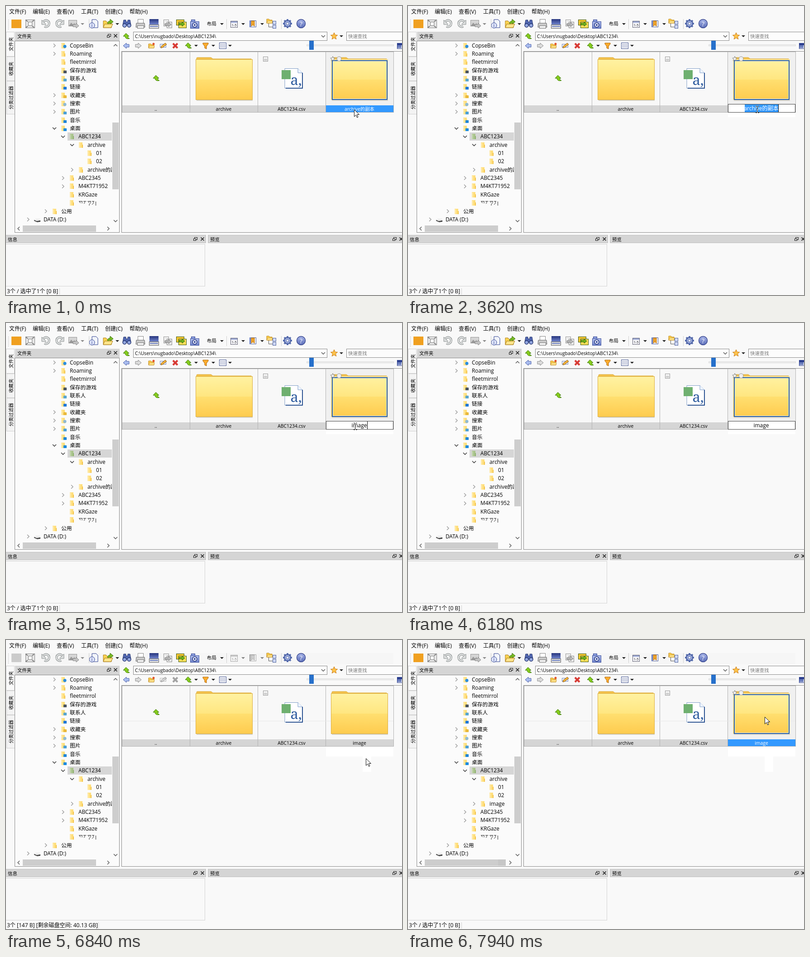
An HTML page with a canvas that plays this animation: 875x640 px, repeating every 8000 ms.

```html
<!DOCTYPE html>
<html lang="zh">
<head>
<meta charset="utf-8">
<style>
html, body { margin: 0; width: 100%; height: 100%; overflow: hidden; background: #f9f9f9 }
canvas { display: block }
</style>
</head>
<body>
<canvas id="stage" width="875" height="640"></canvas>
<script>
const c = document.getElementById('stage').getContext('2d');
const FONT = '"Open Sans","Noto Sans CJK SC","Noto Sans CJK",sans-serif';
const BG = '#f9f9f9', BAR = '#d5d5d5', LINE = '#8a8a8a', BLUE = '#3399ff', NAVY = '#2c3f8f';

// Drawing helpers
function rect(x, y, w, h, fill) { c.fillStyle = fill; c.fillRect(x, y, w, h); }
function box(x, y, w, h, stroke, fill, lw = 1) {
  if (fill) rect(x, y, w, h, fill);
  c.strokeStyle = stroke; c.lineWidth = lw;
  c.strokeRect(x + .5, y + .5, w - 1, h - 1);
}
function text(s, x, y, size = 12, color = '#000', align = 'left', font = FONT) {
  c.font = size + 'px ' + font; c.fillStyle = color; c.textAlign = align;
  c.fillText(s, x, y);
  return c.measureText(s).width;
}
function path(x, y, d, fill, stroke, lw = 1) {
  const p = new Path2D(d);
  c.save(); c.translate(x, y);
  if (fill) { c.fillStyle = fill; c.fill(p); }
  if (stroke) { c.strokeStyle = stroke; c.lineWidth = lw; c.stroke(p); }
  c.restore();
}
function disc(x, y, r, fill, stroke, lw = 1) {
  c.beginPath(); c.arc(x, y, r, 0, 7);
  if (fill) { c.fillStyle = fill; c.fill(); }
  if (stroke) { c.strokeStyle = stroke; c.lineWidth = lw; c.stroke(); }
}
function shade(y0, y1, ...colors) {
  const g = c.createLinearGradient(0, y0, 0, y1);
  colors.forEach((k, i) => g.addColorStop(i / (colors.length - 1), k));
  return g;
}
function muted(on, draw) {
  c.save();
  if (on) c.filter = 'grayscale(1) opacity(.55)';
  draw();
  c.restore();
}

// Small parts
const drop = (x, y, color = '#222') => path(x, y, 'M-4-2H4L0 2Z', color);
const chevron = (x, y, turn, color = '#555') =>
  path(x, y, { r: 'M-2-4L2 0L-2 4', l: 'M2-4L-2 0L2 4', d: 'M-4-2L0 2L4-2', u: 'M-4 2L0-2L4 2' }[turn], null, color, 1.4);
const greenArrow = (x, y) => path(x, y, 'M-1-6.5L-7 0H-3C-3 4 1 7 7 5C4 4 3 2 3 0H6Z', '#86cc1c', '#3d7a0a');
function star(x, y, r, fill, stroke) {
  let d = '';
  for (let i = 0; i < 10; i++) {
    const a = i * Math.PI / 5, q = i % 2 ? r * .45 : r;
    d += (i ? 'L' : 'M') + Math.sin(a) * q + ' ' + -Math.cos(a) * q;
  }
  path(x, y, d + 'Z', fill, stroke);
}
function panelButtons(x, y, gap) {
  box(x - 2, y - 4, 7, 6, '#222'); box(x - 4, y - 1, 6, 5, '#222', BAR);
  path(x + gap, y, 'M-3.5-3.5L3.5 3.5M3.5-3.5L-3.5 3.5', null, '#222', 1.6);
}
function smallFolder(x, y, green) {
  rect(x, y - 6, 8, 12, green ? '#a9c48c' : '#ffdf7d');
  rect(x, y - 5, 3, 11, green ? '#bed3a8' : '#ffe9a6');
  rect(x + 7, y - 1, 2, 7, green ? '#8fb070' : '#f3c34c');
}
function wideFolder(x, y) {
  path(x, y, 'M-6-4H-1L1-2H6V5H-6Z', '#ffd14d', '#bb851c');
  path(x, y, 'M-6 5L-4 0H7L6 5Z', '#ffe38a', '#bb851c', .7);
}

const ROWS = [
  ['CopseBin', 141, 'r', '#2a8de0'], ['Roaming', 141, 'r'], ['fleetmirrol', 141], ['保存的游戏', 141, '', '#4b5560'],
  ['联系人', 141, '', '#58a6cf'], ['链接', 141, '', '#1f78d8'], ['收藏夹', 141, 'r', '#e9b93c'], ['搜索', 141, 'r', '#8fbad4'],
  ['图片', 141, 'r', '#4ba0d8'], ['音乐', 141, '', '#1f86d8'], ['桌面', 141, 'd', '#1b8be0'], ['ABC1234', 160, 'd'],
  ['archive', 180, 'd'], ['01', 199], ['02', 199], ['archive的副本', 180, 'r'], ['ABC2345', 160, 'r'],
  ['M4KT71952', 160, 'r'], ['KRGaze', 160], ['', 160], ['公用', 122, 'r'], ['DATA (D:)', 83, 'r']
];

function tree(renamed) {
  box(19, 77, 232, 425, LINE, '#fbfbfb');
  rect(136, 280, 98, 18, '#d6d6d6');
  c.save(); c.beginPath(); c.rect(20, 78, 214, 407); c.clip();
  ROWS.forEach(([label, x, turn, badge], i) => {
    const y = 87.5 + 18.35 * i, last = i == ROWS.length - 1;
    if (turn) chevron(x - 34, y, turn, turn == 'd' ? '#333' : '#999');
    if (last) {
      path(x - 21, y + 2, 'M0-1L4-4H13L14 0L6 2Z', '#eee');
      path(x - 21, y + 2, 'M0-1L6 1.500L14 0V3L7 4L0 1Z', '#444');
    } else smallFolder(x - 19, Math.round(y), i == 11);
    if (badge) i == 0 || i == 7 ? disc(x - 11, y + 2, 3.5, badge) : rect(x - 14, Math.round(y), 7, 6, badge);
    text(i == 15 && renamed ? 'image' : label, x, y + 4, 11.8);
  });
  // Tiny script label
  path(161, 432, 'M0 .5H8M2 0V3L4 4M7 0V5M10 .5H16M13 0V4L11 6M18 1H19M20 .5H27M22 0V4M26 0V4L23 7V10M29 .5H34M32 0V5L29 8M37.500 1V10', null, '#333');
  c.restore();
  rect(235, 258, 14, 148, '#cdcdcd');
  chevron(242, 87, 'u'); chevron(242, 476, 'd');
  rect(37, 486, 162, 14, '#cdcdcd');
  if (renamed) rect(199, 486, 17, 14, '#c6c6c6');
  chevron(28, 493, 'l'); chevron(226, 493, 'r');
}

function sideTabs() {
  [['文件夹', 57, 112], ['收藏夹', 112, 166], ['分类过滤器', 166, 240]].forEach(([label, top, end], i) => {
    box(i ? 1 : 0, top, 19, end - top, '#d0d0d0', i ? '#f3f3f3' : BG);
    c.save(); c.translate(14.5, (top + end) / 2); c.rotate(-Math.PI / 2);
    text(label, 0, 0, 10.4, '#000', 'center');
    c.restore();
  });
}

function page(x, y, stroke = '#777') {
  path(x, y, 'M-6-9H3L7-5V9H-6Z', '#f3f6fb', stroke);
}

function toolbar(off) {
  ['文件(F)', '编辑(E)', '查看(V)', '工具(T)', '创建(C)', '帮助(H)'].forEach((s, i) => text(s, [7, 59, 112, 166, 219, 273][i], 17));
  for (let y = 30; y < 52; y += 3) rect(5, y, 1, 1, '#999');
  muted(off, () => rect(12, 30, 22, 19, '#f0a020'));
  box(43, 30, 21, 19, '#888', '#e6e6e6'); box(49, 35, 9, 9, '#777', '#fff');
  path(53, 39.500, 'M-9-8L-5-5M9-8L5-5M-9 8L-5 5M9 8L5 5', null, '#777', 2);
  for (const [x, s] of [[88, 1], [119, -1]]) {
    c.save(); c.translate(x, 39); c.scale(s, 1);
    path(0, 0, 'M-6-3A7 7 0 1 1-3 6', null, '#8b9090', 5);
    path(0, 0, 'M-6-3A7 7 0 1 1-3 6', null, '#dcdede', 3);
    path(0, 0, 'M-9-8V2H1Z', '#dcdede', '#8b9090');
    c.restore();
  }
  box(138, 31, 19, 14, '#999', '#d5d5d5'); path(147, 40, 'M-8 4L-3-3L1 1L4-2L8 4Z', '#989898');
  path(154, 44, 'M-6-3H1V-6L7 0L1 5V2H-6Z', '#c5c5c5', '#888'); drop(169, 40, '#888');
  page(196, 39, NAVY); disc(190, 43, 6, '#dfe5fa', NAVY); text('i', 190, 47, 11, NAVY, 'center');
  path(225, 39, 'M-10-6H-4L-2-3H8V9H-10Z', '#ffd452', '#a87b18');
  path(229, 36, 'M-5 6Q-5-3 1-3V-7L8-1L1 4V1Q-2 1-2 6Z', '#79bb23', '#3f7312');
  path(223, 43, 'M-8 5L-5-3H13L9 5Z', '#ffe58b', '#a87b18'); drop(246, 40);
  path(267, 39, 'M-7-8H-2V-4H2V-8H7L9 3H-9Z', '#5268b2', '#24346f');
  disc(262, 43, 4, '#92a6df', '#24346f', 1.5); disc(272, 43, 4, '#92a6df', '#24346f', 1.5);
  box(291, 29, 13, 10, '#888', '#fff'); path(297, 42, 'M-9-4H9L10 5H-10Z', '#ccc', '#666'); box(290, 43, 15, 7, '#777', '#eee');
  rect(317, 29, 20, 12, shade(29, 41, '#26357d', '#6f83cc')); box(316, 41, 22, 9, '#666', '#dedede'); rect(318, 44, 18, 2, '#6e82c5');
  box(348, 30, 12, 15, '#999', '#eee'); box(355, 35, 12, 14, '#888', '#eee'); path(358, 41, 'M-7-2H1V-5L7 0L1 5V2H-7Z', '#bbb', '#777');
  box(376, 30, 18, 13, '#3d5a13', '#f4c531'); box(381, 35, 18, 14, '#3d5a13', '#ffdf58');
  path(388, 40, 'M-6-2H1V-5L7 0L1 5V2H-6Z', '#70b31c', '#2d650c');
  box(409, 30, 9, 6, NAVY, '#8fa3e3'); box(407, 34, 20, 16, '#3b4e9c', shade(34, 50, '#b3c1ef', '#6d82c9'));
  disc(417, 42, 5, '#e6ebfc', '#26357d', 1.5); disc(417, 42, 2, NAVY);
  text('布局', 444, 43, 10.4); drop(477, 40);
  muted(off, () => {
    box(496, 33, 16, 15, '#667', '#f3f3f7'); rect(497, 34, 14, 3, '#9aa7d3'); text('1-5', 504, 45, 7, '#111', 'center'); drop(524, 40);
    box(538, 32, 15, 15, '#4b5c9c', '#fff'); path(546, 39, 'M-4-6H3V6L-.5 3L-4 6Z', '#f0a329', '#a76a12'); rect(538, 32, 3, 15, '#6c80c4'); drop(566, 40);
  });
  path(580, 34, 'M.5 0V12.500H10M.5 3.500H10', null, '#555'); wideFolder(582, 33);
  for (const y of [37, 46]) box(589, y - 4, 8, 8, '#53669f', '#cfd9f6');
  for (const x of [183, 487, 608]) rect(x, 29, 1, 22, '#cfcfcf');
  for (let i = 0; i < 8; i++) {
    c.save(); c.translate(622, 39); c.rotate(i * Math.PI / 4); rect(-2, -10, 4, 5, '#5d73b5'); c.restore();
  }
  disc(622, 39, 7, '#9fb0e2', '#465b9d', 2); disc(622, 39, 3, BG, '#465b9d');
  disc(652, 39, 9.5, shade(29, 49, '#a9b6ea', '#586bb7'), '#414f94', 1.5); text('?', 652, 45, 15, '#fff', 'center');
}

function addressBars(off) {
  greenArrow(266, 67);
  box(281, 57, 429, 20, LINE, '#fcfcfc');
  text('C:\\Users\\nugbado\\Desktop\\ABC1234\\', 285, 71, 10.2);
  chevron(701, 67, 'd');
  star(725, 67, 8, '#ffc34a', '#c87811'); drop(741, 67);
  box(752, 57, 130, 20, LINE, '#fcfcfc'); text('快速查找', 756, 71, 10.4, '#777');
  path(266, 88, 'M-7 0L0-6V-3H6V3H0V6Z', '#a9bdf0', '#4a5ea8');
  path(292, 88, 'M7 0L0-6V-3H-6V3H0V6Z', '#ddd', '#888');
  wideFolder(321, 88); disc(326, 84, 2.5, '#e3542b');
  muted(off, () => {
    box(340, 84, 14, 8, '#7589bf', '#eef2fc'); path(347, 88, 'M-5 5L-4 1L5-6L8-3L-1 4Z', '#f5b33b', '#8a5c15');
  });
  muted(off, () => path(374, 88, 'M-5-5L5 5M5-5L-5 5', null, '#d83a34', 4));
  greenArrow(403, 88); drop(420, 88);
  path(441, 88, 'M-6-6H6V-4L2 1V7L-2 5V1L-6-4Z', '#ffad2d', '#a96209'); drop(458, 88);
  box(471, 81, 16, 14, '#42538f', '#fff');
  for (let i = 0; i < 12; i++) rect(474 + i % 4 * 3, 84 + (i >> 2) * 3, 1, 2, '#42538f');
  drop(495, 88);
  box(664, 85, 193, 4, '#ddd', '#eee'); rect(670, 77, 10, 20, '#2670cb');
  box(864, 82, 16, 13, NAVY, '#fff'); rect(865, 83, 10, 4, NAVY); rect(865, 87, 9, 6, '#6d7fbd');
}

function bigFolder(x, framed) {
  const edge = framed ? '#f3dfa0' : '#dcae3e';
  rect(x + 2, 207, 124, 3, '#d8d4c8');
  path(x, 114, 'M2 6V2Q2 0 4 0H34L38 3H123V8H2Z', '#f3c14c', '#dcae3e');
  rect(x, 118, 126, 45, shade(118, 163, '#fff2a2', '#ffe680'));
  rect(x, 163, 126, 45, shade(163, 208, '#ffdf70', '#fecb4e'));
  box(x, 118, 126, 90, edge);
  if (framed) {
    c.strokeStyle = '#fff4cc'; c.lineWidth = 1; c.strokeRect(x + 4.500, 122.500, 118, 83);
    c.strokeStyle = '#285fa8'; c.lineWidth = 2; c.strokeRect(x + 3, 121, 121, 86);
  }
}

function csvIcon() {
  path(616, 138, 'M0 .5H29L39 10V44H0Z', shade(138, 182, '#fff', '#d3e3f7'), '#7f9cc6');
  path(616, 138, 'M29 0V10H39', '#eef5ff', '#7f9cc6');
  rect(618, 181, 38, 2, '#2e5593'); rect(654, 148, 2, 34, '#2e5593');
  text('a,', 641, 175, 31, '#2c5a9e', 'center', '"Noto Serif",serif');
  rect(609, 142, 20, 20, '#6fb070');
}

function browser(s) {
  box(255, 100, 640, 402, LINE, BG);
  for (let i = 0; i < 4; i++) {
    const x = 257 + 150 * i;
    rect(x, 101, 149, 119, i == 3 && s.framed ? '#f0f0f0' : '#f8f8f8');
    rect(x, 220, 149, 15, BAR);
    box(x - 1, 101, 151, 135, '#b3b3b3');
  }
  if (s.trail) rect(707, 236, 149, s.trail - 236, '#fff');
  if (s.trail > 250) rect(788, 258, 19, 34, '#fff');
  if (s.committed) rect(257, 179, 599, 1, '#e9e9e9');
  greenArrow(332, 160);
  bigFolder(419); csvIcon(); bigFolder(718, s.framed);
  box(568, 112, 11, 11, '#999', '#f3f3f3'); rect(570, 117, 7, 4, '#d0d0d0');
  if (s.hover) { star(722, 117, 5.5, '#f3f3f3', '#888'); disc(736, 117, 5, '#eee', '#999'); }
  ['..', 'archive', 'ABC1234.csv'].forEach((l, i) => text(l, 331 + 150 * i, 231.500, 10.4, '#000', 'center'));
  if (s.edit === null) {
    if (s.framed) rect(707, 220, 149, 15, BLUE);
    text(s.committed ? 'image' : 'archive的副本', 781, 231.500, 10.4, s.framed ? '#fff' : '#000', 'center');
  } else {
    box(707, 217, 149, 19, '#444', '#fff');
    if (s.selected) rect(744, 218, 74, 17, BLUE);
    const w = text(s.edit, 780.5, 231, 12, s.selected ? '#fff' : '#000', 'center');
    if (s.caret) rect(s.selected ? 818 : Math.round(780.5 + w / 2), 218, 1, 17, '#000');
  }
}

function bottom(s) {
  box(-1, 507, 443, 18, '#c0c0c0', BAR); box(446, 507, 440, 18, '#c0c0c0', BAR);
  text('信息', 4, 521, 10.4); text('预览', 451, 521, 10.4);
  panelButtons(418, 516, 16); panelButtons(858, 516, 15);
  box(-2, 527, 442, 94, '#d3d3d3');
  text(s.off ? '3个 [147 B] [剩余磁盘空间: 40.13 GB]' : '3个 / 选中了1个 [0 B]', 2, 636);
  rect(s.off ? 204 : 118, 625, 1, 14, '#d0d0d0');
}

// Last entry whose start time has passed
const at = (t, list) => list.reduce((v, [start, value]) => t >= start ? value : v, null);

function stateAt(t) {
  const committed = t >= 6720, off = committed && t < 7940;
  return {
    committed, off,
    framed: !off,
    selected: t >= 1470 && t < 4050,
    edit: at(t, [[1470, 'archive的副本'], [4050, 'i'], [4170, 'im'], [4600, 'ima'], [5000, 'imag'], [5150, 'image'], [6720, null]]),
    caret: at(t, [[1470, 1], [2000, 0], [2560, 1], [3060, 0], [3620, 1], [5900, 0], [6330, 1]]),
    hover: t < 6480 || t >= 7110,
    renamed: t >= 6990,
    trail: at(t, [[1470, 246], [6480, 258]]),
    beam: at(t, [[1470, [772, 229]], [6180, null], [6330, [773, 235]], [6480, null]]),
    arrow: at(t, [[0, [769, 229]], [1470, null], [6480, [779, 240]], [6600, [796, 273]], [6840, [795, 262]],
      [6990, [792, 222]], [7110, [788, 178]], [7260, [788, 170]]])
  };
}

function draw(t) {
  const s = stateAt(t);
  rect(0, 0, 875, 640, BG);
  if (s.committed) rect(13, 29, 843, 25, '#f6f6f6');
  toolbar(s.off);
  sideTabs();
  rect(20, 57, 231, 20, BAR); text('文件夹', 25, 71, 10.4); panelButtons(227, 66, 15);
  addressBars(s.off);
  tree(s.renamed);
  browser(s);
  bottom(s);
  if (s.beam) {
    c.globalCompositeOperation = 'difference';
    path(...s.beam, 'M-4-7.500H-1M1-7.500H4M-4 7.500H-1M1 7.500H4M-.5-7V7', null, '#fff', 1);
    c.globalCompositeOperation = 'source-over';
  }
  if (s.arrow) path(s.arrow[0] + .5, s.arrow[1] + .5, 'M0 0V15.500L3.700 12L6.200 17.500L8.500 16.500L6 11H11Z', '#fff', '#111');
}

function frame() {
  draw(performance.now() % 8000);
  requestAnimationFrame(frame);
}
frame();
</script>
</body>
</html>
```
